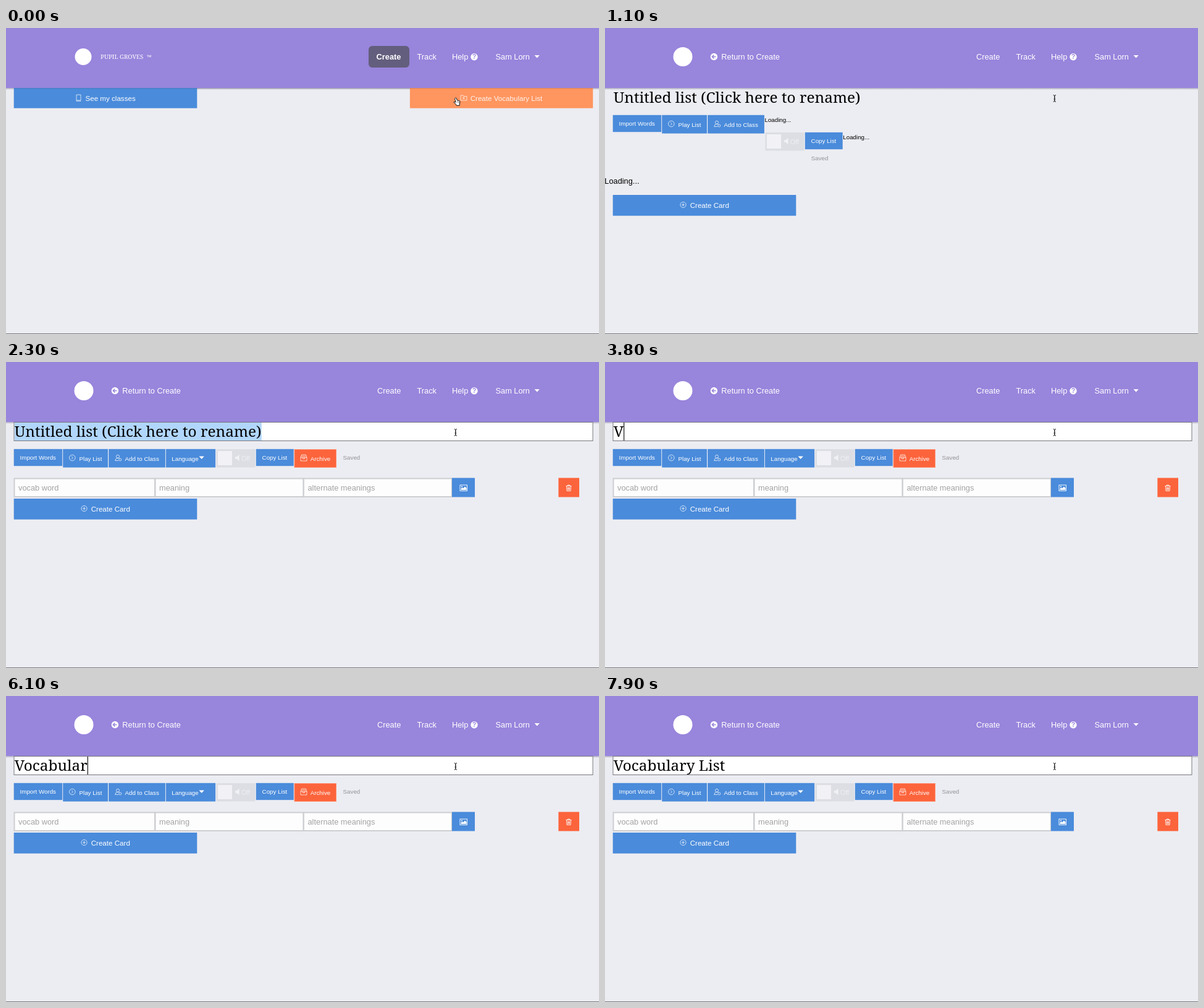
Write an HTML page that moves like this. It is 960 px wide and 495 px high and loops after 8000 ms.

```html
<!DOCTYPE html>
<html lang="en">
<head>
<meta charset="utf-8">
<title>Vocabulary list</title>
<style>
html, body { margin: 0; width: 100%; height: 100%; overflow: hidden; background: #ecedf2; }
svg { display: block; }
text { font: 12.8px "Liberation Sans", Arial, sans-serif; white-space: pre; }
.mid { font-size: 11.6px; }
.small { font-size: 9.75px; }
.w { fill: #fff; }
.grey { fill: #929297; }
.hint { fill: #a3a3a5; }
.serif { font-family: "Noto Serif", serif; }
.title { font-size: 24.4px; }
.mark { font-size: 9.8px; }
.blue { fill: #4a8bdb; }
.red { fill: #fc643c; }
.field { fill: #fdfdfd; stroke: #cdced1; stroke-width: 2; }
.icon { fill: none; stroke: #fff; stroke-width: .9; }
.soft { opacity: .8; }
</style>
</head>
<body>
<svg width="960" height="495" viewBox="0 0 960 495">
  <defs>
    <linearGradient id="shade" x2="0" y2="1">
      <stop stop-color="#aaa7bd"/><stop offset="1" stop-color="#ecedf2"/>
    </linearGradient>
  </defs>
  <rect width="960" height="495" fill="#ecedf2"/>
  <rect y="97" width="960" height="3" fill="url(#shade)"/>
  <rect width="960" height="97" fill="#9885dc"/>
  <rect y="494" width="960" height="1" fill="#77787c"/>

  <g class="w">
    <text x="665.5" y="51">Track</text>
    <text x="722" y="51">Help</text>
    <circle cx="758" cy="46.7" r="5.7"/>
    <text x="758" y="50.4" text-anchor="middle" style="font-size:10px;font-weight:bold;fill:#9885dc">?</text>
    <text x="792.5" y="51">Sam Lorn</text>
    <path d="M855.5 44h8.4l-4.2 4.4z"/>
  </g>

  <g id="home">
    <circle class="w" cx="125" cy="46.5" r="13.5"/>
    <text class="w serif mark" x="153" y="50">PUPIL GROVES</text>
    <text class="w" x="227" y="49.5" style="font-size:9px">™</text>
    <rect x="587" y="29" width="66" height="35" rx="6" fill="#635e7d"/>
    <text class="w" x="619.5" y="51" text-anchor="middle" style="font-weight:bold">Create</text>
    <rect class="blue" x="12.7" y="97" width="296.6" height="32.7"/>
    <rect x="653.9" y="97" width="296.3" height="32.7" fill="#ff955f"/>
    <rect x="12.7" y="97" width="937.5" height="1.5" fill="#444" opacity=".15"/>
    <path class="icon soft" d="M114 108h7v9h-7zM114 117v1.2h7.5"/>
    <text class="w mid" x="128.5" y="118">See my classes</text>
    <path class="icon soft" d="M736 109h4l1 1.5h5v6.5h-10zM741 111.5v3.5M739.2 113.2h3.6"/>
    <text class="w mid" x="751.7" y="118" opacity=".9">Create Vocabulary List</text>
    <path d="M727.5 113.2q1.3-.8 1.8.7l1 3 3.6.9q1.5.4 1.1 2.2l-.8 3.1v2.3h-4.8l-1-2-3.5-3.2q.2-1.6 2-.7l1.3.8-1.5-5.4q0-1 .8-1.7z" fill="#fff" stroke="#111"/>
    <path d="M730.8 118.5l.5 2M733 119l.3 1.8" stroke="#111" stroke-width=".7"/>
  </g>

  <g id="head">
    <circle class="w" cx="126" cy="46.5" r="15.5"/>
    <circle class="w" cx="176.4" cy="46.5" r="5.7"/>
    <path d="M179.6 46.5h-6M176.4 43.5l-3 3 3 3" fill="none" stroke="#9885dc" stroke-width="1.6"/>
    <text class="w" x="188.3" y="50.5">Return to Create</text>
    <text class="w" x="601" y="51">Create</text>
  </g>

  <text id="wait" x="-.7" y="202">Loading...</text>

  <g id="edit">
    <rect id="box" x="13" y="97.5" width="937" height="30" fill="#fff"/>
    <rect id="pick" x="14" y="98" height="29" fill="#b1d6fc"/>
    <text id="title" class="serif title" y="121"></text>
    <rect id="caret" y="98" width="1.1" height="29"/>
    <path d="M725.6 108.5q2.2 0 2.2 1.4v8q0 1.4-2.2 1.4M730 108.5q-2.2 0-2.2 1.4v8q0 1.4 2.2 1.4M726.5 115h2.6" fill="none" stroke="#222"/>

    <rect class="blue" x="12.7" y="140.8" width="78.5" height="27.4"/>
    <rect class="blue" x="92.2" y="140.8" width="72.8" height="29.8"/>
    <rect class="blue" x="166.2" y="140.8" width="91.7" height="29.8"/>
    <text class="w small" x="22.6" y="158">Import Words</text>
    <circle class="icon soft" cx="107.3" cy="155" r="4.8"/>
    <path class="icon soft" d="M106 152.5l2.5 2.5-2.5 2.5"/>
    <text class="w small" x="118.5" y="160.3">Play List</text>
    <g class="icon soft">
      <circle cx="181" cy="152.8" r="2.5"/>
      <path d="M176.7 159.5q.3-4 4.3-4 2 0 3 1M176.7 159.5h5.5"/>
      <circle cx="184.8" cy="158" r="2"/>
    </g>
    <text class="w small" x="192.5" y="160.3">Add to Class</text>

    <g id="move">
      <rect x="340.3" y="141" width="63.2" height="29.5" fill="#dcdee3"/>
      <rect x="343" y="144" width="23" height="23" fill="#f2f2f6"/>
      <path d="M371 153.3h2.5l4-3.5v10.4l-4-3.5H371z" fill="#f2f2f6"/>
      <text x="381" y="160" fill="#eeeff3" style="font-size:10.5px">Off</text>
      <rect class="blue" x="404.8" y="140.8" width="60.9" height="27.4"/>
      <text class="w small" x="414.6" y="158">Copy List</text>
    </g>

    <g id="loading">
      <text class="small" x="258.5" y="151.5">Loading...</text>
      <text class="small" x="385.3" y="179.5">Loading...</text>
      <text class="small grey" x="333.8" y="214">Saved</text>
      <text x="-.7" y="251.5">Loading...</text>
    </g>

    <g id="ready">
      <rect class="blue" x="258.9" y="140.8" width="80.2" height="29.8"/>
      <text class="w small" x="268.3" y="160">Language</text>
      <path class="w" d="M312.5 152.5h8.4l-4.2 4.6z"/>
      <rect class="red" x="467" y="141.5" width="67.5" height="29" stroke="#ff9273"/>
      <path class="icon soft" d="M477 154.5h10v5.5h-10zM477 154.5l1.7-4.5h6.6l1.7 4.5M478.5 152.3h7M480.5 154.5v2h3v-2"/>
      <text class="w small" x="492.7" y="160.3">Archive</text>
      <text class="small grey" x="545.6" y="158">Saved</text>
      <rect class="field" x="13.5" y="188.5" width="227.5" height="29.5"/>
      <rect class="field" x="241.5" y="188.5" width="240" height="29.5"/>
      <rect class="field" x="481.8" y="188.5" width="240" height="29.5"/>
      <text class="hint" x="20" y="208.3">vocab word</text>
      <text class="hint" x="248" y="208.3">meaning</text>
      <text class="hint" x="488.5" y="208.3">alternate meanings</text>
      <rect class="blue" x="722" y="187.5" width="37" height="31"/>
      <rect class="icon" x="735" y="199" width="11.5" height="9.5"/>
      <path class="w" d="M736.5 207v-2l2-2 1.5 1.5 3-3 2.500 2.500v3z"/>
      <circle class="w" cx="738" cy="201.5" r="1"/>
      <rect class="red" x="894.4" y="187.5" width="33.6" height="31"/>
      <path class="icon" d="M906.5 200.5h9M909.3 200.5v-1.5h3.4v1.5M907.5 201l.5 7.5h6l.5-7.5M909.7 202.5v4.5M911 202.5v4.5M912.3 202.5v4.5"/>
    </g>

    <g id="card">
      <rect class="blue" x="12.7" y="221" width="296.6" height="33.7"/>
      <circle class="icon soft" cx="126.5" cy="237" r="4.6"/>
      <path class="icon soft" d="M124 237h5M126.5 234.5v5"/>
      <text class="w mid" x="137.7" y="242">Create Card</text>
    </g>
  </g>
</svg>
<script>
const $ = id => document.getElementById(id);
const show = (id, on) => $(id).style.display = on ? '' : 'none';
const put = (id, attrs) => { for (const k in attrs) $(id).setAttribute(k, attrs[k]); };

const LOOP = 8000, LEAVE = 600, OPEN = 1000, LOADED = 1400, SELECT = 2200, FIRST = 3500;
const NEXT = 4300, STEP = 240, BLINK = 450, LEFT = 13.7;
const before = 'Untitled list (Click here to rename)', after = 'Vocabulary List';

function draw(t) {
  const loaded = t >= LOADED, picked = t >= SELECT && t < FIRST, typing = t >= FIRST;
  const count = Math.min(after.length, t < NEXT ? 1 : 2 + Math.floor((t - NEXT) / STEP));
  const lastKey = !typing ? LOADED : count < 2 ? FIRST : NEXT + (count - 2) * STEP;

  show('home', t < LEAVE);
  show('head', t >= LEAVE);
  show('wait', t >= 800 && t < OPEN);
  show('edit', t >= OPEN);
  show('loading', !loaded);
  show('ready', loaded);
  put('move', { transform: loaded ? '' : 'translate(-81 28)' });
  put('card', { transform: loaded ? '' : 'translate(0 49)' });

  $('title').textContent = typing ? after.slice(0, count) : before;
  put('title', { x: LEFT });
  const width = t < OPEN ? 0 : $('title').getComputedTextLength();
  show('box', loaded);
  put('box', { stroke: t < SELECT ? '#6c9bdc' : '#77787c' });
  show('pick', picked);
  put('pick', { width });
  show('caret', loaded && !picked && (t - lastKey) % (2 * BLINK) < BLINK);
  put('caret', { x: LEFT + width });
}

function tick() {
  draw(performance.now() % LOOP);
  requestAnimationFrame(tick);
}
tick();
</script>
</body>
</html>
```
